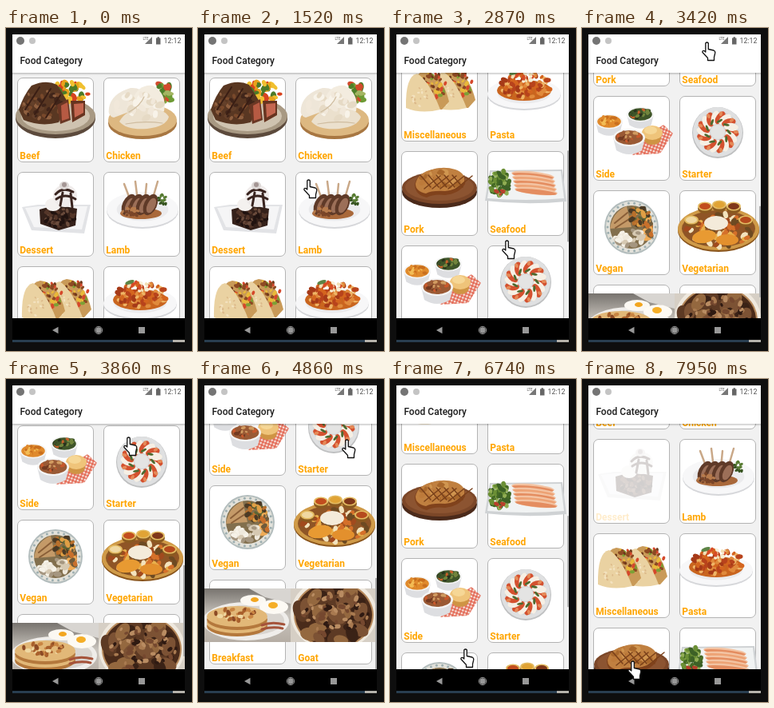
Write an HTML page that moves like this. It is 233 px wide and 404 px high and loops after 8 s.

```html
<!DOCTYPE html>
<html lang="en">
<head>
<meta charset="utf-8">
<title>Food Category</title>
<style>
html, body { margin: 0; width: 100%; height: 100%; overflow: hidden; background: #0e0e0e; }
svg { display: block; }
#stage { width: 100vw; height: 100vh; }
text { font-family: Roboto, sans-serif; }
.label { font-size: 12px; font-weight: 700; fill: #ffa500; }
</style>
</head>
<body>
<svg id="stage" viewBox="0 0 233 404">
  <defs>
    <pattern id="check" width="4" height="4" patternUnits="userSpaceOnUse" patternTransform="rotate(20)">
      <rect width="4" height="4" fill="#f6e6e0"/><rect width="2" height="4" fill="#e0563f" opacity=".65"/>
      <rect width="4" height="2" fill="#e0563f" opacity=".65"/>
    </pattern>
    <linearGradient id="shade" x2="0" y2="1"><stop stop-color="#000" stop-opacity=".22"/><stop offset="1" stop-color="#000" stop-opacity="0"/></linearGradient>
    <linearGradient id="table" x2="0" y2="1"><stop stop-color="#77736e"/><stop offset=".5" stop-color="#c9c4bd"/><stop offset="1" stop-color="#b5ada4"/></linearGradient>
  </defs>
  <rect width="233" height="404" fill="#0e0e0e"/>
  <rect x="8" y="8" width="216" height="356" fill="#f1f1f1"/>
  <svg x="8" y="56" width="216" height="307"><g id="list"></g></svg>
  <rect id="bar" x="222" width="2" height="114" fill="#a9a9a9"/>
  <rect x="8" y="56" width="216" height="3" fill="url(#shade)"/>
  <rect x="8" y="8" width="216" height="48" fill="#fff"/>
  <circle cx="18" cy="16" r="5" fill="#747474"/>
  <circle cx="33" cy="16" r="4" fill="#c4c4c4"/>
  <text x="171.500" y="14.500" font-size="4.5" fill="#555">LTE</text>
  <path d="M183 11v9h-9z" fill="#777"/>
  <path d="M188 12.5h1.5v-1.3h2.500v1.300h1.500v8h-5.500z" fill="#666"/>
  <text x="197.500" y="19" font-size="8.800" fill="#505050">12:12</text>
  <text x="17.400" y="44.500" font-size="12" font-weight="500" fill="#1b1b1b">Food Category</text>
  <rect x="8" y="363" width="216" height="27" fill="#000"/>
  <g fill="#989898">
    <path d="M58 378l7.500-4.300v8.600z"/>
    <circle cx="116" cy="378" r="4.700" fill="none" stroke="#989898"/>
    <circle cx="116" cy="378" r="3.700"/>
    <rect x="166" y="374" width="8" height="8"/>
  </g>
  <rect x="8" y="390" width="201" height="3" fill="#293e50"/>
  <rect x="209" y="390" width="15" height="3" fill="#b5b2ab"/>
  <path id="hand" d="M4.800 2Q6.600 0 8.300 2V9.500L15 11Q17.200 12 16.700 14.500L15.500 19.500V23.500H7.500V20.500L1 13.500Q.4 10.800 3.200 11.600L4.800 13Z" fill="#fff" stroke="#111" stroke-width="1.300" stroke-linejoin="round"/>
</svg>
<script>
const $ = id => document.getElementById(id);

// Drawing helpers
const E = (x, y, rx, ry, fill, turn = 0) =>
  `<ellipse cx="${x}" cy="${y}" rx="${rx}" ry="${ry}" fill="${fill}" transform="rotate(${turn} ${x} ${y})"/>`;
const P = (d, fill) => `<path d="${d}" fill="${fill}"/>`;
const line = (d, color, width) =>
  `<path d="${d}" fill="none" stroke="${color}" stroke-width="${width}" stroke-linecap="round"/>`;
const repeat = (n, draw) => Array.from({ length: n }, (_, i) => draw(i)).join('');

// Scatters n crumbs inside an ellipse
function bits(n, x, y, rx, ry, size, colors) {
  let seed = 7919 * (n + x);
  const rnd = () => (seed = (seed * 16807 + 11) % 2147483647) / 2147483647;
  return repeat(n, i => {
    const a = rnd() * 2 * Math.PI, r = Math.sqrt(rnd()), k = size * (.6 + rnd() * .6);
    return E(x + Math.cos(a) * r * rx, y + Math.sin(a) * r * ry, k, k * .65,
      colors.split(' ')[i % colors.split(' ').length], rnd() * 180);
  });
}

const ring = (n, x, y, r, draw) => repeat(n, i => {
  const a = i / n * 2 * Math.PI;
  return draw(x + Math.cos(a) * r, y + Math.sin(a) * r, i, i / n * 360);
});

const plate = (x, y, rx, ry) =>
  E(x, y + 2, rx, ry, '#d6d7da') + E(x, y, rx, ry, '#f7f7f8') + E(x, y, rx * .72, ry * .66, '#ebebed');

const bowl = (x, y, r, colors) =>
  P(`M${x - r} ${y}L${x - r * .8} ${y + r * .8}Q${x} ${y + r * 1.3} ${x + r * .8} ${y + r * .8}L${x + r} ${y}Z`, '#dddee1') +
  E(x, y, r, r * .55, '#f5f5f5') + E(x, y, r * .87, r * .45, colors.split(' ')[0]) +
  bits(22, x, y - 1, r * .72, r * .36, 3, colors);

const cup = (x, y, fill) => E(x, y + 3, 9, 6, '#8a5a20') + E(x, y, 9, 5.5, '#e3bb62') + E(x, y, 7, 4, fill);

const taco = (x, y) => `<g transform="translate(${x} ${y})">` +
  P('M8 46Q4 4 24 0Q46 2 55 38L46 48Z', '#c99a58') +
  bits(60, 34, 18, 19, 16, 3, '#6f3a1c #7da035 #d5482b #e9b93a #8d4a23') +
  P('M1 46Q0 6 15 3Q30 12 44 48Q20 54 1 46Z', '#ead2a2') +
  bits(16, 18, 33, 11, 14, 2, '#dcb98a #f3e2bf') + '</g>';

const chop = i => {
  const x = 34 + i * 9;
  return line(`M${x} 36L${x - 8 + i * 5} ${15 - i % 2 * 3}`, '#c9a888', 2.5) +
    E(x - 2, 41, 8, 14, '#5f3a28', 25) + E(x - 1, 42, 5, 10, '#9c6f58', 25);
};

const salmon = i => E(57 + i, 30 + i * 5, 27, 4.5, '#f3c3a2', 6) + E(57 + i, 31 + i * 5, 26, 3, i % 2 ? '#eda274' : '#e48d60', 6);

const dishes = [
  ['Beef',
    E(48, 51, 50, 25, '#5c4a3c') + E(48, 48, 50, 23, '#a89983') + E(48, 48, 43, 19, '#cfc3b0') +
    bits(40, 68, 17, 22, 12, 5, '#e8a21c #d8431f #4c7a28 #f0c030') +
    P('M2 40Q8 22 18 10Q36 2 50 9L63 30L52 56Q30 62 8 53Z', '#593722') +
    bits(50, 31, 33, 24, 20, 3.5, '#79492b #40251a #8f6040 #64402a') +
    line('M10 40L28 12M22 46L42 14M36 50L54 22', '#3a1e14', 2) +
    P('M50 34L64 27L67 53L54 58Z', '#6a3724') + P('M55 35L63 31L65 51L56 54Z', '#b75a43') +
    P('M67 29L85 29V47L69 56Z', '#673420') + P('M71 33L83 32V44L72 50Z', '#c56750')],
  ['Chicken',
    E(49, 57, 43, 20, '#a87742') + E(49, 53, 43, 20, '#ddb881') +
    bits(28, 77, 20, 9, 16, 5, '#6d9a34 #4f7f2a #d24a2c #a3b562') +
    P('M7 38Q10 20 34 13Q48 12 51 22Q49 36 32 43L13 50Q5 48 7 38Z', '#eee6d8') +
    P('M36 28Q44 8 62 10Q80 20 76 42Q62 50 44 43Z', '#f3ecdf') +
    P('M20 55Q28 40 50 38Q76 38 82 49Q79 61 55 64Q29 66 20 55Z', '#ebe0cd') +
    bits(26, 44, 36, 30, 17, 6, '#f8f3e9 #e6dac5 #f1e8da') +
    line('M32 43Q46 36 51 24M28 58Q52 54 74 57', '#cfbc9f', 1.2)],
  ['Dessert',
    P('M6 44L26 41H92L84 77L18 73Z', '#e2e3e6') + P('M10 45L28 43H88L81 72L21 69Z', '#f5f5f6') +
    P('M28 47L50 41L75 46L73 67L52 73L29 65Z', '#35211a') +
    bits(50, 51, 57, 22, 11, 3, '#543629 #211310 #6b4c3c') +
    E(45, 41, 10, 8, '#f4f1ef') + E(60, 30, 15, 14, '#f0eceb') +
    line('M48 28Q57 18 70 25M49 34Q60 26 73 34M57 26L54 42M67 27L69 44', '#39241f', 3) +
    E(59, 17, 6, 5, '#ddd8d6') + E(59, 16, 3, 3, '#a49694')],
  ['Lamb',
    plate(49, 47, 45, 22) + E(47, 52, 26, 7, '#a9683a') + repeat(4, chop) +
    bits(16, 34, 49, 12, 6, 3, '#7a4528 #b77b4c') + bits(14, 74, 36, 5, 8, 2.5, '#587c33 #35521f')],
  ['Miscellaneous', taco(38, 16) + taco(5, 18)],
  ['Pasta',
    plate(46, 46, 46, 19) + E(46, 42, 34, 13, '#c9651f') +
    bits(90, 46, 36, 33, 15, 4, '#e08a3c #b8431c #efb566 #d4651f #a63a18') +
    bits(18, 45, 26, 14, 6, 3, '#f2dfb4 #f7eed6 #d74b25') + E(33, 20, 6, 2.5, '#5d8446', -20)],
  ['Pork',
    E(48, 51, 47, 20, '#4b2a1a') + E(48, 46, 47, 20, '#7c4728') + E(48, 45, 43, 17, '#8c5431') +
    P('M17 43Q18 30 34 25Q52 18 68 24Q82 29 80 41Q73 53 55 55Q41 53 32 58Q18 55 17 43Z', '#80421c') +
    P('M18 41Q20 29 35 24Q52 18 68 23Q81 28 79 38Q69 49 55 50Q38 49 31 53Q18 50 18 41Z', '#c08040') +
    bits(30, 48, 36, 25, 11, 4, '#d09650 #a9682c #bd7a3a') +
    repeat(5, i => line(`M${24 + i * 10} 30l13 15m-8 2l20-16`, '#7a411b', 1.5))],
  ['Seafood',
    P('M3 24L94 23L99 63Q49 68 -3 62Z', '#cfd2d4') + P('M5 26L92 25L96 59Q49 63 0 59Z', '#f1f3f3') +
    bits(60, 16, 40, 13, 15, 4, '#6b8f35 #456a25 #91ae54 #3d6126') + bits(4, 16, 50, 7, 4, 3, '#b9402c') +
    repeat(5, salmon)],
  ['Side',
    P('M58 55L88 36L100 47L84 72L49 74Z', 'url(#check)') +
    bowl(20, 32, 17, '#e08a2c #f3bc55 #c96f1e') + bowl(59, 23, 17, '#3f5529 #71843c #c6612b #29331d') +
    E(74, 53, 11, 8, '#cf9444') + E(74, 46, 13, 9, '#efc47a') + E(72, 43, 8, 5, '#f6d796') +
    bowl(45, 52, 20, '#9a5a35 #d09a60 #733a21 #c9592c')],
  ['Starter',
    E(48, 46, 32, 32, '#bfc0c1') + E(48, 45, 31, 31, '#dfe0e1') + E(48, 45, 26, 26, '#d3d5d6') +
    ring(18, 48, 45, 18, (x, y, i, a) => E(x, y, 9, 5, i % 2 ? '#f6efe4' : '#d4512f', a + 25)) +
    ring(9, 48, 45, 14, (x, y, i, a) => E(x, y, 4, 1.5, '#4c6a30', a + 50)) +
    ring(9, 48, 45, 23, (x, y, i, a) => E(x, y, 3, 2, '#e58a58', a)) + E(48, 45, 9, 9, '#e4e4e3')],
  ['Vegan',
    E(48, 46, 34, 34, '#b3bdbd') + E(48, 46, 32, 32, '#e3e2db') +
    ring(26, 48, 46, 30, (x, y) => E(x, y, 1.5, 1.5, '#9caeb0')) + E(48, 46, 27, 27, '#826f4d') +
    P('M48 46L21 48Q24 27 42 20Z', '#c49a68') + line('M27 41L43 28M28 47L45 36', '#8a5f38', 2) +
    bits(44, 57, 32, 13, 11, 4, '#4b3a25 #5c6534 #b9702c #e0a045') +
    bits(24, 68, 50, 7, 12, 4, '#c8702c #efac57 #6f5b3b') +
    bits(36, 45, 59, 17, 11, 4.5, '#efe9dc #d6c9b2 #a59680 #f6f2e8')],
  ['Vegetarian',
    E(49, 50, 51, 27, '#8a551c') + E(49, 48, 51, 27, '#cf9a48') + E(49, 48, 46, 23, '#8f5526') +
    bits(70, 49, 50, 42, 20, 5, '#e8b04c #a14a1e #f3e3bd #d5702a #6d4a22') +
    cup(32, 20, '#c24d1e') + cup(50, 18, '#e0a335') + cup(68, 20, '#803719') +
    cup(15, 37, '#f0d8a2') + cup(83, 37, '#b54a1d') +
    E(46, 41, 15, 9, '#f4ebda') + E(31, 58, 15, 8, '#e89a32', -10) + E(60, 62, 14, 7, '#e3902d')],
  ['Breakfast',
    P('M-6 11H102V78H-6Z', 'url(#table)') + P('M50 11H102V30L70 22Z', '#d8d5d1') +
    E(46, 52, 54, 24, '#efedea') + E(46, 51, 48, 19, '#d9d5d0') +
    E(55, 26, 16, 7, '#fbf8f2') + E(57, 25, 5, 3, '#f2a620') + E(81, 34, 18, 9, '#fdfaf4') + E(80, 32, 6, 4, '#f5ae27') +
    repeat(4, i => E(35, 58 - i * 4, 38, 13, i % 2 ? '#e2b878' : '#b4783c')) +
    bits(34, 33, 43, 26, 8, 3.5, '#a9602c #c98543 #efd7a1 #8c4a25') +
    line('M66 57Q78 52 94 56M66 62Q80 58 92 61', '#a5533a', 3)],
  ['Goat',
    '<svg x="-6" y="11" width="108" height="67"><rect width="108" height="67" fill="#d6cfc5"/>' +
    E(54, 32, 54, 46, '#efe9df') + E(54, 33, 50, 42, '#b78a5c') + E(54, 33, 48, 40, '#4a2b1a') +
    bits(44, 54, 33, 42, 34, 12, '#5d3a24 #7c5234 #3a2216 #94683f') +
    bits(60, 55, 31, 42, 30, 4, '#a97a50 #2f1a12 #b98c62 #75482f') + '</svg>']
];

$('list').innerHTML = dishes.map(([name, art], i) =>
  `<g transform="translate(${6 + i % 2 * 108} ${6 + (i >> 1) * 118})">
    <rect x=".5" y=".5" width="95" height="105" rx="6.5" fill="#fff" stroke="#acacac" stroke-width=".9"/>
    <g id="${name}"><g class="art">${art}</g><text class="label" x="3.300" y="102.300">${name}</text></g></g>`).join('');

// Motion
const LOOP = 8000, STEP = 111, PHASE = 68;
const VIEW = 307, CONTENT = 826, FLING = 600;

// Each fling: start time, resting scroll offset
const flings = [[2258, 262], [3100, 476], [4100, 519], [5780, 310], [6740, 105]];
// Hand stops: time, x, y
const stops = [[190, 207, 348], [970, 114, 134], [1300, 114, 134], [1970, 190, 369], [2280, 138, 127],
  [2400, 138, 127], [2840, 140, 265], [3190, 143, 358], [3410, 150, 14], [3840, 147, 72], [4840, 180, 75],
  [5540, 70, 100], [5760, 56, 369], [6530, 84, 120], [6725, 88, 337], [7610, 58, 115], [7945, 57, 352]];

const ramp = (t, start, length) => Math.min(1, Math.max(0, (t - start) / length));
const easeOut = u => 1 - (1 - u) ** 3;
const smooth = u => u * u * (3 - 2 * u);

const scrollAt = t => flings.reduce((y, [start, to]) => y + (to - y) * easeOut(ramp(t, start, FLING)), 0);
const barAt = t => Math.max(...flings.map(([start]) => t < start ? 0 : 1 - ramp(t, start + FLING + 300, 250)));

function handAt(t) {
  const next = stops.findIndex(s => s[0] > t);
  const b = stops.at(next), a = stops[Math.max(0, next < 0 ? stops.length - 1 : next - 1)];
  const u = a === b ? 0 : smooth(ramp(t, a[0], b[0] - a[0]));
  return [1, 2].map(k => Math.round(a[k] + (b[k] - a[k]) * u));
}

function draw(time) {
  // The screen refreshes in coarse steps
  const t = Math.floor((time - PHASE) / STEP) * STEP + PHASE;
  const scroll = scrollAt(t), loaded = ramp(t, 2255, 300);
  $('list').setAttribute('transform', `translate(0 ${-Math.round(scroll)})`);
  $('bar').setAttribute('y', 56 + scroll * VIEW / CONTENT);
  $('bar').setAttribute('opacity', barAt(t));
  $('hand').setAttribute('transform', `translate(${handAt(t)})`);
  $('hand').setAttribute('visibility', time < 190 ? 'hidden' : 'visible');
  for (const name of ['Pork', 'Seafood']) $(name).firstChild.setAttribute('opacity', loaded);
  $('Dessert').setAttribute('opacity', 1 - .8 * ramp(t, 7700, 200));
}

const begin = performance.now();
function loop() {
  draw((performance.now() - begin) % LOOP);
  requestAnimationFrame(loop);
}
loop();
</script>
</body>
</html>
```
